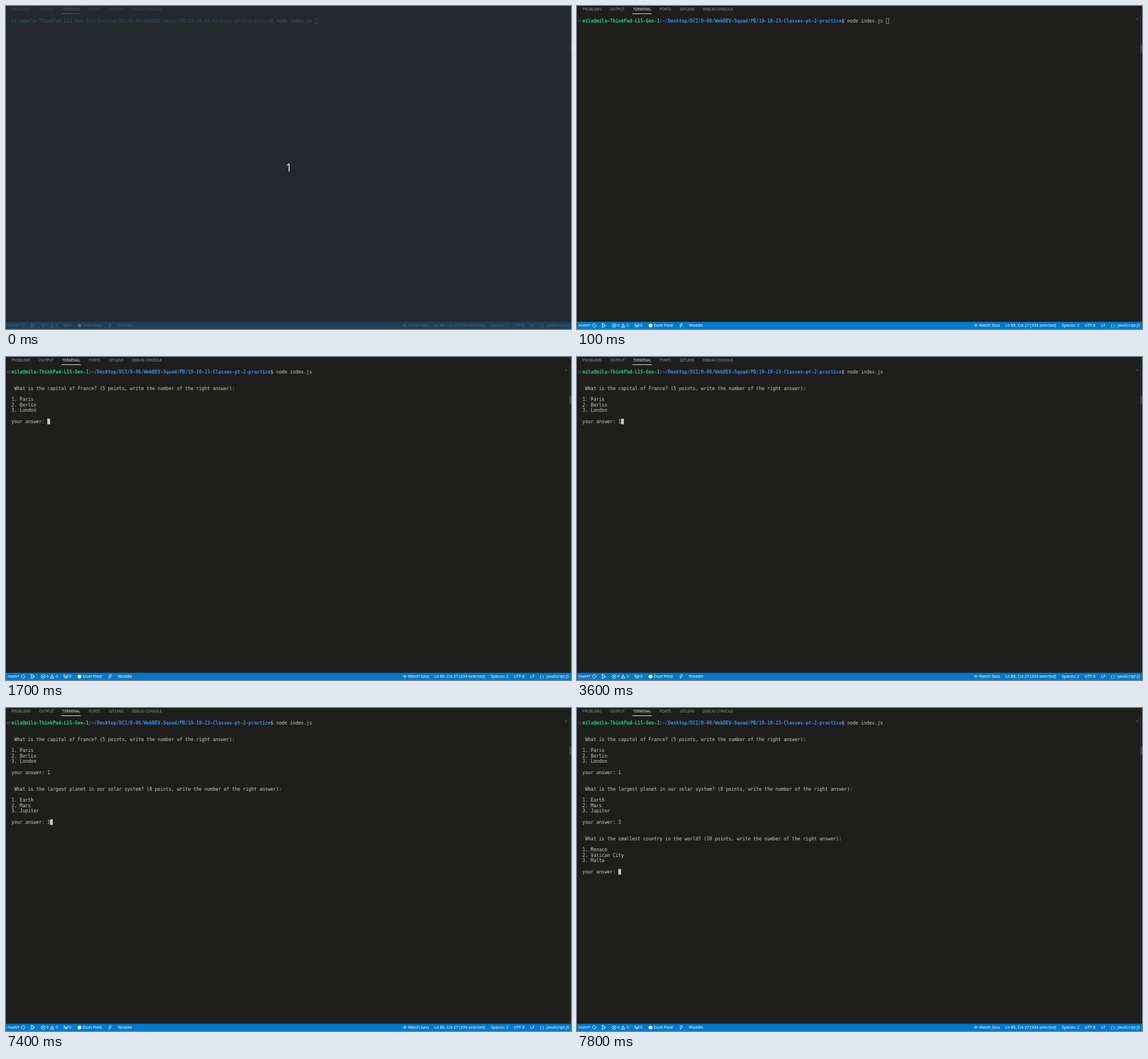
These frames come from a looping animation (989x566 px, 8 s). An HTML page:

```html
<!DOCTYPE html>
<html lang="en">
<head>
<meta charset="utf-8">
<title>Terminal quiz</title>
<style>
html, body { margin: 0; width: 100%; height: 100%; overflow: hidden; background: #1e1e1c; }
#stage { position: relative; width: 989px; height: 566px; overflow: hidden; background: #1e1e1c; }
#stage div, #stage span.at, svg { position: absolute; white-space: pre; }
.tab { top: 0; font: 6.45px/11px "Noto Sans", "Open Sans", sans-serif; color: #9a9a9a; }
.tab.on { color: #e7e7e7; }
.row { left: 9.6px; font: 8.02px/9.667px "DejaVu Sans Mono", monospace; color: #ccc; }
.host { color: #23d18b; font-weight: bold; }
.path { color: #3b8eea; font-weight: bold; }
#bar { left: 0; top: 553px; width: 989px; height: 13px; }
.item { top: 1px; font: 7px/12px "Noto Sans", "Open Sans", sans-serif; color: #fff; }
#dim { inset: 0; z-index: 1; background: rgba(39, 43, 51, .75); }
#count { left: 0; width: 990px; top: 271px; text-align: center; color: #e4e6e8;
  font: 19px/25px "Noto Sans", "Open Sans", sans-serif; }
</style>
</head>
<body>
<div id="stage">
  <div style="left:97px;top:13px;width:34px;height:1px;background:#e7e7e7"></div>
  <div style="left:986px;top:15px;width:1px;height:538px;background:#383838"></div>
  <div style="left:986px;top:68px;width:3px;height:14px;background:#424242"></div>
  <div id="term"></div>
  <svg width="989" height="566" style="left:0;top:0" fill="none">
    <circle cx="4.4" cy="26.3" r="1.9" stroke="#777" stroke-width=".8"/>
    <path d="M979.8 21l1.8 1.9-1.8 1.9" stroke="#aaa" stroke-width=".7"/>
    <rect id="cursor" width="4.2" height="9.1" stroke="#ccc" stroke-width=".6"/>
  </svg>
  <div id="bar">
    <svg width="989" height="13" style="left:0;top:0" fill="none" stroke="#fff" stroke-width=".8">
      <rect y=".4" width="989" height="13" fill="#007acc" stroke="none"/>
      <path d="M27.2 6.2a3 3 0 0 1 5.6-.9M32.8 7.2a3 3 0 0 1-5.6 1M26 6.2l1.2 1.2 1.3-1.2M31.6 7.2l1.2-1.2 1.2 1.2"/>
      <path d="M44.6 4.5v4.2M45.4 4.2q3.6-.5 3.2 2.2M45 9.4q3.6.2 3.6-1.8"/>
      <circle cx="44.6" cy="3.8" r="1"/><circle cx="44.6" cy="9.4" r="1"/><circle cx="48.6" cy="7" r="1"/>
      <circle cx="65" cy="7" r="3.3"/><path d="M63.7 5.7l2.6 2.6M66.3 5.7l-2.6 2.6"/>
      <path d="M80.7 3.7l3.2 6.2h-6.4zM80.7 5.8v2M80.7 8.4v.8"/>
      <path d="M105 6l-2 4.3M105 6l2 4.3M103.8 8.7h2.4M103.2 4.3q-1.2 1.7 0 3.2M106.8 4.3q1.2 1.7 0 3.2M102 3.4q-2 2.5 0 5M108 3.4q2 2.5 0 5"/>
      <circle cx="128.6" cy="7" r="3.2" fill="#fff" stroke="none"/>
      <path d="M181.6 3.5h2.4l-1 2.4h1.5l-3.8 4.6.9-3.2h-1.6z" stroke-width=".7"/>
      <path d="M694.9 7.2q3.2-4.6 6.4 0"/><circle cx="698.1" cy="7.3" r="1.3"/>
    </svg>
  </div>
  <div id="dim"><div id="count">1</div></div>
</div>
<script>
const LOOP = 8000, LEFT = 9.6, TOP = 21.3, CELL = 4.83, LINE = 9.667;
const $ = id => document.getElementById(id);

function label(parent, cls, x, text) {
  const el = document.createElement("span");
  el.className = "at " + cls;
  el.style.left = x + "px";
  el.textContent = text;
  parent.append(el);
}

[[9.8, "PROBLEMS"], [58, "OUTPUT"], [98.3, "TERMINAL"], [144.8, "PORTS"], [180, "GITLENS"], [220, "DEBUG CONSOLE"]]
  .forEach(([x, text]) => label($("stage"), text === "TERMINAL" ? "tab on" : "tab", x, text));

[[3, "main*"], [70.5, "0"], [87, "0"], [110.6, "0"], [134.5, "Duet Field"], [195.8, "Woddle"],
 [703.7, "Watch Sass"], [749.7, "Ln 88, Col 27 (334 selected)"], [848.8, "Spaces: 2"], [888.7, "UTF-8"],
 [917.6, "LF"], [934.4, "{ }"], [946, "JavaScript JS"]]
  .forEach(([x, text]) => label($("bar"), "item", x, text));

// Terminal rows, each visible from a given time
const rows = [];
function addRow(line, html, from) {
  const el = document.createElement("div");
  el.className = "row";
  el.style.top = TOP + 0.5 + line * LINE + "px";
  el.innerHTML = html;
  $("term").append(el);
  rows.push({ el, from });
}

addRow(0, '<span class="host">mila@mila-ThinkPad-L15-Gen-1</span>:' +
  '<span class="path">~/Desktop/DCI/D-06/WebDEV-Squad/PB/19-10-23-Classes-pt-2-practice</span>$ node index.js', 0);

const quiz = [
  { at: 1700, ask: "What is the capital of France?", points: 5, options: ["Paris", "Berlin", "London"], reply: "1", typed: 3600 },
  { at: 4100, ask: "What is the largest planet in our solar system?", points: 8, options: ["Earth", "Mars", "Jupiter"], reply: "3", typed: 7400 },
  { at: 7800, ask: "What is the smallest country in the world?", points: 10, options: ["Monaco", "Vatican City", "Malta"] }
];

// Cursor steps: time, column, line, filled
const steps = [[0, 110, 0, false], [800, 110, 0, true], [1500, 0, 1, true]];

quiz.forEach((q, i) => {
  const line = 3 + 9 * i;
  addRow(line, ` ${q.ask} (${q.points} points, write the number of the right answer):`, q.at);
  q.options.forEach((text, n) => addRow(line + 2 + n, `${n + 1}. ${text}`, q.at));
  addRow(line + 6, "your answer: ", q.at);
  steps.push([q.at, 13, line + 6, true]);
  if (q.reply) {
    addRow(line + 6, " ".repeat(13) + q.reply, q.typed);
    steps.push([q.typed, 14, line + 6, true]);
  }
});

function draw(now) {
  const t = now % LOOP;
  $("dim").style.display = t < 100 ? "block" : "none";
  rows.forEach(r => { r.el.style.visibility = t >= r.from ? "visible" : "hidden"; });
  const [, col, line, filled] = steps.filter(s => s[0] <= t).pop();
  const cursor = $("cursor");
  cursor.setAttribute("x", LEFT + col * CELL + 0.3);
  cursor.setAttribute("y", TOP + line * LINE + 0.3);
  cursor.setAttribute("fill", filled ? "#ccc" : "none");
}

const start = performance.now();
function tick() {
  draw(performance.now() - start);
  requestAnimationFrame(tick);
}
tick();
</script>
</body>
</html>
```
